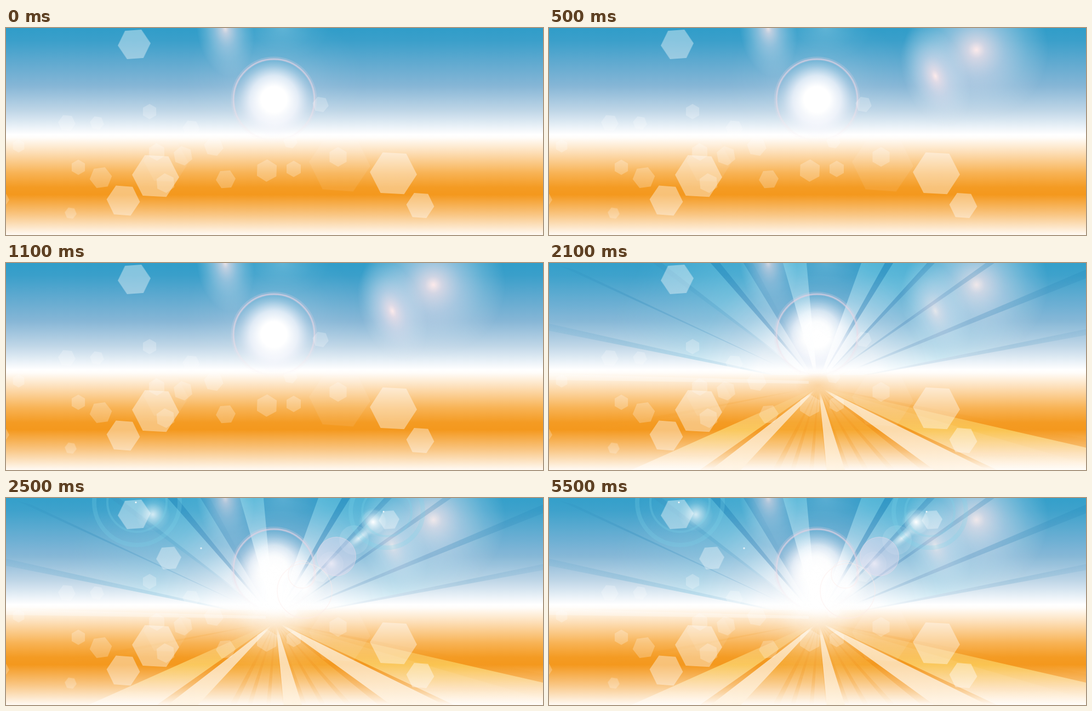
These frames come from a looping animation (980x379 px, 7500 ms). An HTML page without scripts:

```html
<!DOCTYPE html>
<html lang="en">
<head>
<meta charset="utf-8">
<title>Sunrise</title>
<style>
html, body { margin: 0; width: 100%; height: 100%; overflow: hidden; background: #fff; }
svg { display: block; width: 100vw; height: 100vh; }
.glints { animation: glints 7.5s step-end infinite; }
.rays { animation: rays 7.5s step-end infinite; }
.flares { animation: flares 7.5s step-end infinite; }
@keyframes glints { 0% { opacity: 0 } 6.666%, 100% { opacity: 1 } }
@keyframes rays { 0% { opacity: 0 } 20%, 100% { opacity: 1 } }
@keyframes flares { 0% { opacity: 0 } 33.333%, 100% { opacity: 1 } }
</style>
</head>
<body>
<svg viewBox="0 0 980 379" preserveAspectRatio="none">
<defs>
  <linearGradient id="land" x2="0" y2="1">
    <stop offset="0" stop-color="#309dc9"/>
    <stop offset=".06" stop-color="#3a9fca"/>
    <stop offset=".15" stop-color="#5aa8cf"/>
    <stop offset=".28" stop-color="#86b6d6"/>
    <stop offset=".4" stop-color="#bfd6e7"/>
    <stop offset=".47" stop-color="#e6eff6"/>
    <stop offset=".515" stop-color="#fff"/>
    <stop offset=".53" stop-color="#fffdfa"/>
    <stop offset=".6" stop-color="#fddfb8"/>
    <stop offset=".7" stop-color="#f8b355"/>
    <stop offset=".77" stop-color="#f49b23"/>
    <stop offset=".805" stop-color="#f4981d"/>
    <stop offset=".9" stop-color="#f9c581"/>
    <stop offset="1" stop-color="#fffaf4"/>
  </linearGradient>
  <radialGradient id="soft">
    <stop offset="0" stop-color="#fff"/>
    <stop offset=".3" stop-color="#fff" stop-opacity=".6"/>
    <stop offset=".65" stop-color="#fff" stop-opacity=".2"/>
    <stop offset="1" stop-color="#fff" stop-opacity="0"/>
  </radialGradient>
  <radialGradient id="sun">
    <stop offset="0" stop-color="#fff"/>
    <stop offset=".32" stop-color="#fff"/>
    <stop offset=".6" stop-color="#fbfaff" stop-opacity=".72"/>
    <stop offset=".85" stop-color="#f4f4fc" stop-opacity=".22"/>
    <stop offset="1" stop-color="#f4f4fc" stop-opacity="0"/>
  </radialGradient>
  <radialGradient id="pink">
    <stop offset="0" stop-color="#fdeaea"/>
    <stop offset=".12" stop-color="#f2e1e9" stop-opacity=".8"/>
    <stop offset=".4" stop-color="#e2e0ee" stop-opacity=".5"/>
    <stop offset=".7" stop-color="#dce6f2" stop-opacity=".22"/>
    <stop offset="1" stop-color="#dce6f2" stop-opacity="0"/>
  </radialGradient>
  <linearGradient id="rim" x2="0" y2="1">
    <stop offset="0" stop-color="#e3d0e2"/>
    <stop offset=".6" stop-color="#ecdbe6" stop-opacity=".8"/>
    <stop offset="1" stop-color="#fbf3f5" stop-opacity=".2"/>
  </linearGradient>
  <radialGradient id="beam" gradientUnits="userSpaceOnUse" cx="490" cy="222" r="520">
    <stop offset=".035" stop-color="#fff" stop-opacity="0"/>
    <stop offset=".07" stop-color="#fff" stop-opacity=".8"/>
    <stop offset=".22" stop-color="#fafdff" stop-opacity=".62"/>
    <stop offset=".32" stop-color="#cdeef8" stop-opacity=".44"/>
    <stop offset=".44" stop-color="#8fdcee" stop-opacity=".42"/>
    <stop offset=".75" stop-color="#8fdcee" stop-opacity=".08"/>
  </radialGradient>
  <radialGradient id="shade" gradientUnits="userSpaceOnUse" cx="490" cy="222" r="520">
    <stop offset=".16" stop-color="#438fc0" stop-opacity="0"/>
    <stop offset=".35" stop-color="#438fc0" stop-opacity=".22"/>
    <stop offset=".7" stop-color="#2a88b9" stop-opacity=".28"/>
    <stop offset="1" stop-color="#2a88b9" stop-opacity=".12"/>
  </radialGradient>
  <radialGradient id="pale" gradientUnits="userSpaceOnUse" cx="492" cy="226" r="300">
    <stop offset=".04" stop-color="#fff3dd" stop-opacity="0"/>
    <stop offset=".09" stop-color="#fff3dd" stop-opacity=".72"/>
    <stop offset="1" stop-color="#fff6e8" stop-opacity=".72"/>
  </radialGradient>
  <linearGradient id="amber" gradientUnits="userSpaceOnUse" x1="0" y1="232" x2="0" y2="379">
    <stop offset="0" stop-color="#f5a437" stop-opacity="0"/>
    <stop offset=".12" stop-color="#f5a437" stop-opacity=".3"/>
    <stop offset=".5" stop-color="#f39a22" stop-opacity=".5"/>
    <stop offset=".75" stop-color="#f6ab49" stop-opacity=".3"/>
    <stop offset="1" stop-color="#fbd3a0" stop-opacity="0"/>
  </linearGradient>
  <linearGradient id="gold" gradientUnits="userSpaceOnUse" x1="0" y1="225" x2="0" y2="379">
    <stop offset="0" stop-color="#fbd794" stop-opacity="0"/>
    <stop offset=".25" stop-color="#fbcf7c" stop-opacity=".4"/>
    <stop offset=".52" stop-color="#fbcf5e" stop-opacity=".8"/>
    <stop offset=".8" stop-color="#feecd0" stop-opacity=".65"/>
    <stop offset="1" stop-color="#fff" stop-opacity=".7"/>
  </linearGradient>
  <radialGradient id="ember">
    <stop offset="0" stop-color="#f7b45c" stop-opacity=".3"/>
    <stop offset="1" stop-color="#f7b45c" stop-opacity="0"/>
  </radialGradient>
  <clipPath id="sky"><path d="M0 0H980V205H0Z"/></clipPath>
  <path id="hex" d="M1 0L.5 .866L-.5 .866L-1 0L-.5-.866L.5-.866Z" fill="#fff"/>
</defs>

<path fill="url(#land)" d="M0 0H980V379H0Z"/>

<!-- standing glows -->
<g fill="url(#soft)">
  <ellipse cx="490" cy="95" rx="165" ry="125" opacity=".2"/>
  <ellipse cx="505" cy="0" rx="85" ry="60" opacity=".2"/>
</g>
<ellipse cx="400" cy="0" rx="52" ry="90" transform="rotate(-8 400 0)" fill="url(#pink)" opacity=".9"/>
<circle cx="489" cy="131" r="73" fill="url(#sun)"/>

<g class="glints" fill="url(#pink)">
  <circle cx="780" cy="40" r="132"/>
  <ellipse cx="705" cy="88" rx="58" ry="98" transform="rotate(-20 705 88)"/>
</g>

<g class="rays">
  <g clip-path="url(#sky)">
    <path fill="url(#beam)" d="M490 222L190 0H295ZM490 222L427 0H470ZM490 222L570 0H613ZM490 222L628 0H690Z"/>
    <path fill="url(#beam)" opacity=".6" d="M490 222L312 0H355ZM490 222L704 0H797ZM490 222L0 0H190ZM490 222L0 124V0ZM490 222L813 0H980V12ZM490 222L980 28V121Z"/>
    <path fill="url(#shade)" d="M490 222L20 5L46 12ZM490 222L190 0H206ZM490 222L295 0H312ZM490 222L355 0H372ZM490 222L613 0H628ZM490 222L690 0H704ZM490 222L797 0H813ZM490 222L980 12V28Z"/>
    <path fill="url(#shade)" opacity=".6" d="M490 222L0 111V124ZM490 222L980 121V132ZM490 222L372 0H427ZM490 222L470 0H570ZM490 222L515 0H522Z"/>
  </g>
  <circle cx="489" cy="130" r="50" fill="url(#soft)"/>
  <ellipse cx="490" cy="224" rx="40" ry="22" fill="url(#ember)"/>
  <path fill="#fff" opacity=".3" d="M0 203L474 216V221L0 214Z"/>
  <path fill="url(#gold)" d="M492 226L150 379H275ZM492 226L980 338V379H818Z"/>
  <path fill="url(#gold)" opacity=".35" d="M492 226L350 379H505ZM492 226L540 379H680Z"/>
  <path fill="url(#pale)" d="M492 226L295 379H350ZM492 226L507 379H540ZM492 226L703 379H800Z"/>
  <path fill="url(#pale)" opacity=".12" d="M492 226L150 379H275ZM492 226L818 379H980V368Z"/>
  <path fill="url(#amber)" d="M492 226L275 379H295ZM492 226L680 379H703ZM492 226L800 379H818ZM492 226L408 379H420ZM492 226L440 379H449ZM492 226L475 379H483ZM492 226L540 379H549ZM492 226L574 379H584ZM492 226L620 379H632Z"/>
  <path fill="url(#amber)" opacity=".6" d="M492 226L80 302L110 304ZM492 226L980 322V338Z"/>
</g>

<!-- halo -->
<g fill="none" stroke="url(#rim)">
  <circle cx="489" cy="131" r="75" stroke-width="7" opacity=".25"/>
  <circle cx="489" cy="131" r="74" stroke-width="2.6" opacity=".65"/>
</g>

<!-- hexagons -->
<g opacity=".4">
  <use href="#hex" transform="translate(234 30) rotate(-4) scale(30)"/>
  <use href="#hex" transform="translate(273 271) rotate(3) scale(43)"/>
  <use href="#hex" transform="translate(707 266) rotate(3) scale(43)"/>
  <use href="#hex" transform="translate(214 316) rotate(4) scale(30.5)"/>
  <use href="#hex" transform="translate(756 325) rotate(4) scale(25.5)"/>
</g>
<g opacity=".24">
  <use href="#hex" transform="translate(173 274) rotate(-8) scale(20.5)"/>
  <use href="#hex" transform="translate(401 277) rotate(-4) scale(18)"/>
  <use href="#hex" transform="translate(476 261) rotate(32) scale(20.5)"/>
  <use href="#hex" transform="translate(525 258) rotate(30) scale(15)"/>
  <use href="#hex" transform="translate(606 236) rotate(30) scale(18)"/>
  <use href="#hex" transform="translate(574 140) rotate(10) scale(15)"/>
  <use href="#hex" transform="translate(262 153) rotate(30) scale(14)"/>
  <use href="#hex" transform="translate(111 174) rotate(5) scale(16)"/>
  <use href="#hex" transform="translate(166 174) rotate(10) scale(13)"/>
  <use href="#hex" transform="translate(132 255) rotate(30) scale(14)"/>
  <use href="#hex" transform="translate(118 339) rotate(8) scale(11)"/>
  <use href="#hex" transform="translate(338 184) rotate(5) scale(16)"/>
  <use href="#hex" transform="translate(275 227) rotate(28) scale(16)"/>
  <use href="#hex" transform="translate(323 234) rotate(20) scale(18)"/>
  <use href="#hex" transform="translate(379 217) rotate(10) scale(18)"/>
  <use href="#hex" transform="translate(291 284) rotate(25) scale(18)"/>
  <use href="#hex" transform="translate(23 216) rotate(30) scale(12)"/>
  <use href="#hex" transform="translate(-6 314) rotate(4) scale(12)"/>
  <use href="#hex" transform="translate(519 208) rotate(10) scale(13)"/>
</g>
<g opacity=".09">
  <use href="#hex" transform="translate(609 249) rotate(4) scale(56)"/>
  <use href="#hex" transform="translate(292 245) rotate(2) scale(41)"/>
</g>

<g class="flares">
  <g fill="url(#soft)">
    <circle cx="490" cy="222" r="118" opacity=".4"/>
    <ellipse cx="491" cy="170" rx="88" ry="92"/>
    <ellipse cx="490" cy="185" rx="62" ry="55"/>
    <circle cx="545" cy="165" r="40"/>
    <circle cx="268" cy="30" r="32" opacity=".75"/>
    <circle cx="670" cy="44" r="26"/>
    <circle cx="594" cy="120" r="18" opacity=".7"/>
    <ellipse cx="646" cy="72" rx="32" ry="11" transform="rotate(-38 646 72)" opacity=".85"/>
  </g>
  <g fill="#fff">
    <circle cx="237" cy="8" r="1.6" opacity=".9"/>
    <circle cx="356" cy="92" r="1.8" opacity=".7"/>
    <circle cx="689" cy="25" r="1.5" opacity=".85"/>
    <circle cx="635" cy="77" r="27" opacity=".12"/>
    <circle cx="593" cy="121" r="23" opacity=".1"/>
    <circle cx="671" cy="44" r="22" opacity=".08"/>
  </g>
  <circle cx="603" cy="107" r="35.5" fill="#e6d9ef" fill-opacity=".4" stroke="#f1dcea" stroke-opacity=".5"/>
  <g fill="none" stroke="#fdeae8" stroke-width="1.5" opacity=".45">
    <circle cx="545" cy="170" r="50"/>
    <circle cx="540" cy="140" r="25"/>
  </g>
  <g fill="none" stroke="#7fd4e8" opacity=".24">
    <circle cx="239" cy="8" r="78" stroke-width="8"/>
    <circle cx="239" cy="8" r="54" stroke-width="4"/>
    <circle cx="695" cy="25" r="66" stroke-width="8"/>
    <circle cx="695" cy="25" r="45" stroke-width="4"/>
  </g>
  <g opacity=".36">
    <use href="#hex" transform="translate(297 110) rotate(-4) scale(23)"/>
    <use href="#hex" transform="translate(699 40) rotate(-4) scale(19)"/>
  </g>
</g>
</svg>
</body>
</html>
```
